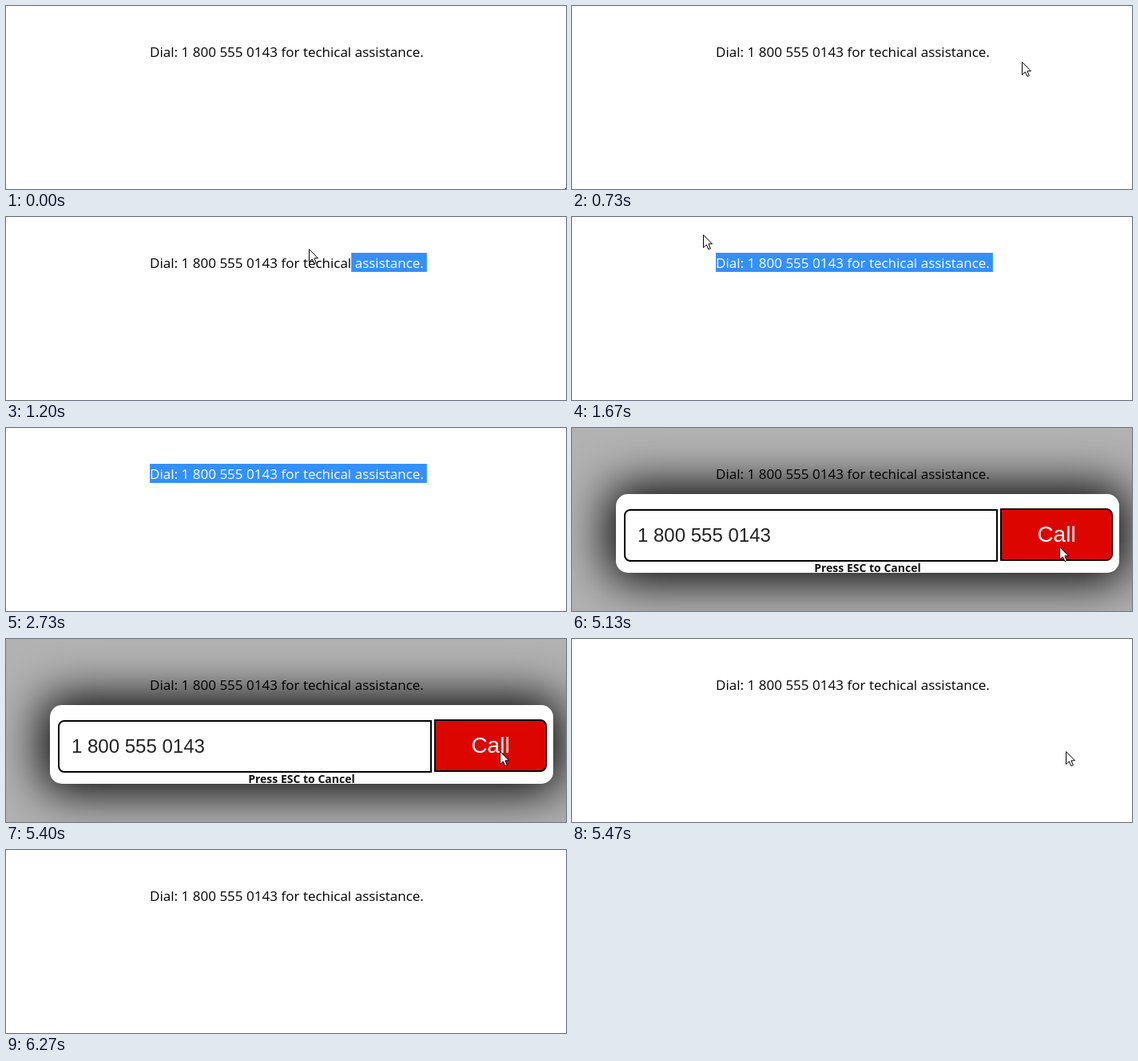
Write an HTML page that moves like this. It is 701 px wide and 230 px high and loops after 7.34 s.

```html
<!DOCTYPE html>
<html lang="en">
<head>
<meta charset="utf-8">
<title>Select a number to call</title>
<style>
html, body { margin: 0; width: 100%; height: 100%; overflow: hidden; background: #fff; }
body { position: relative; }
body * { position: absolute; box-sizing: border-box; margin: 0; white-space: pre; }
.line { left: 180px; top: 45px; padding-top: 1px; font: 17px/23px "Open Sans", sans-serif;
  word-spacing: .1px; color: #000; }
#marked { background: #3390ff; color: #fff; padding-right: 4px; }
#overlay { inset: 0; background: rgba(0, 0, 0, .3); }
#box { left: 55px; top: 83px; width: 630px; height: 99px; border-radius: 15px; background: #fff;
  box-shadow: 0 0 60px 10px #000; }
#field { left: 10px; top: 19px; width: 468px; height: 66px; border: 2px solid #000;
  border-radius: 8px 0 0 8px; padding: 17px 15px; font: 24px/28px "Liberation Sans", Arial, sans-serif; color: #222; }
#caret { left: 194px; top: 38px; width: 1px; height: 28px; background: #000; }
#call { left: 481px; top: 18px; width: 141px; height: 66px; border: 2px solid #000;
  border-radius: 0 8px 8px 0; background: #dc0500; color: #fff; text-align: center;
  font: 28px/62px "Liberation Sans", Arial, sans-serif; }
#hint { left: 0; top: 83px; width: 100%; text-align: center; font: bold 14px/20px "Open Sans", sans-serif; color: #111; }
#dot { left: 700px; top: 229px; width: 1px; height: 1px; background: #000; }
#cursor { left: 0; top: 0; overflow: visible; }
</style>
</head>
<body>
<p class="line" id="plain">Dial: 1 800 555 0143 for techical assistance.</p>
<p class="line" id="marked"></p>
<div id="overlay">
  <div id="box">
    <div id="field">1 800 555 0143</div>
    <div id="caret"></div>
    <div id="call">Call</div>
    <div id="hint">Press ESC to Cancel</div>
  </div>
</div>
<div id="dot"></div>
<svg id="cursor" width="12" height="19">
  <path d="M.5 .5V16.5L4.3 12.9 6.9 18.5 9.3 17.5 6.9 11.8H11.5Z" fill="#fff" stroke="#000"/>
</svg>
<script>
const LOOP = 7340, FPS = 15;
const $ = id => document.getElementById(id);
const plain = $("plain"), marked = $("marked"), cursor = $("cursor");
marked.textContent = plain.textContent;

// Pointer strokes; start and end are ticks, bend bows the path sideways.
const strokes = [
  { start: 6, end: 12, from: [686, 213], to: [557, 63] },
  { start: 14, end: 25, from: [557, 63], to: [164, 22], bend: [0, -4] },
  { start: 30, end: 35, from: [164, 22], to: [4, 103] },
  { start: 37, end: 40, from: [4, 103], to: [3, 110], bend: [10, 0] },
  { start: 75, end: 78, from: [645, 209], to: [618, 141], bend: [-25, -7] },
  { start: 89, end: 93, from: [618, 141], to: [553, 222] }
];

// Smoothstep with an early peak in speed.
function ease(u) {
  const v = u ** .75;
  return v * v * (3 - 2 * v);
}

function pointer(tick) {
  const { start, end, from, to, bend = [0, 0] } = strokes.findLast(s => s.start <= tick) || strokes[0];
  const u = Math.min(1, Math.max(0, (tick - start) / (end - start)));
  const e = ease(u), bow = Math.sin(Math.PI * e);
  return from.map((a, i) => Math.round(a + (to[i] - a) * e + bend[i] * bow));
}

// Snaps a position to the nearest character edge of the line.
const range = document.createRange(), node = plain.firstChild, left = plain.offsetLeft;
range.setStart(node, 0);
const edges = Array.from({ length: node.length + 1 }, (_, i) => {
  range.setEnd(node, i);
  return i && range.getBoundingClientRect().width;
});
const nearest = x => edges.reduce((a, b) => Math.abs(b - x) < Math.abs(a - x) ? b : a);

const show = (el, on) => el.style.display = on ? "" : "none";
const within = (t, a, b) => t >= a && t < b;

function draw(now) {
  const tick = Math.floor((now % LOOP + 4) * FPS / 1000);
  const [x, y] = pointer(tick);
  show($("dot"), tick === 0);
  show(cursor, within(tick, 6, 41) || within(tick, 75, 94));
  cursor.style.transform = `translate(${x}px, ${y}px)`;

  // The selection trails the pointer by one tick.
  show(marked, within(tick, 17, 54));
  marked.style.clipPath = `inset(0 0 0 ${nearest(pointer(tick - 1)[0] - left)}px)`;

  show($("overlay"), within(tick, 54, 82));
  show($("caret"), (tick - 54) % FPS < 7);
}

let origin;
function loop(now) {
  origin ??= now;
  draw(now - origin);
  requestAnimationFrame(loop);
}
draw(0);
requestAnimationFrame(loop);
</script>
</body>
</html>
```
